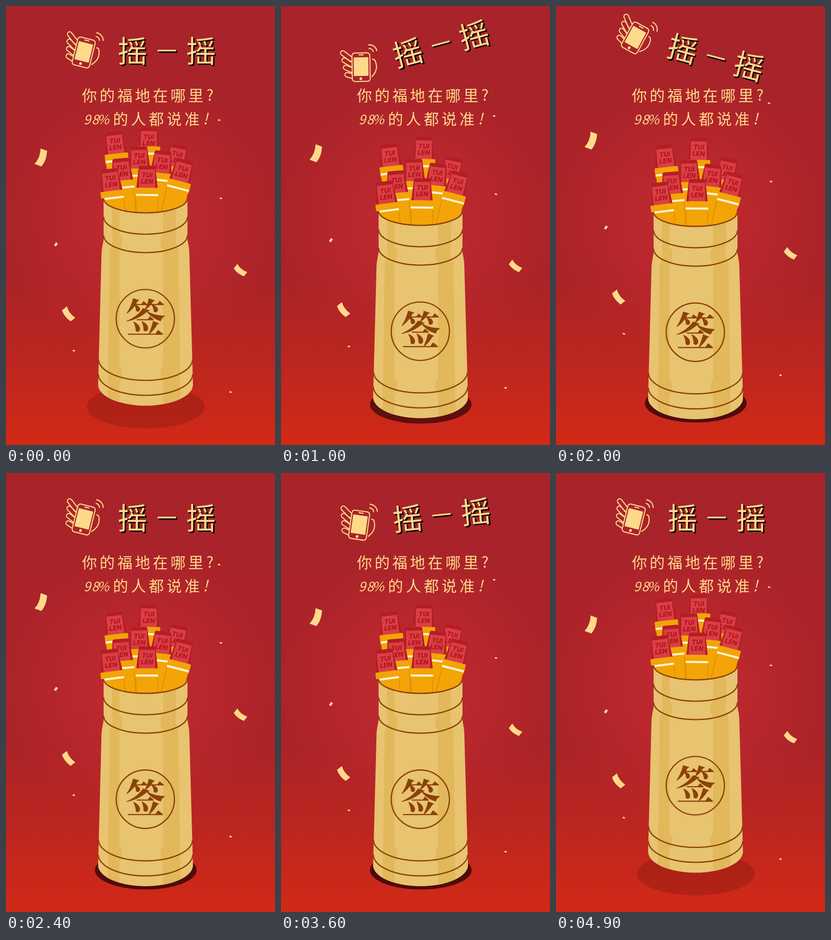
Write an HTML page with a canvas that moves like this. It is 587 by 954 pixels and loops after 5 s.

```html
<!DOCTYPE html>
<html lang="zh-CN">
<head>
<meta charset="utf-8">
<title>摇一摇</title>
<style>
  html, body { margin: 0; width: 100%; height: 100%; overflow: hidden; background: #a9232a; }
  canvas { display: block; width: 587px; height: 954px; }
</style>
</head>
<body>
<canvas id="stage" width="587" height="954" aria-label="摇一摇"></canvas>
<script>
const ctx = document.getElementById('stage').getContext('2d');
const W = 587, H = 954, TAU = Math.PI * 2;
const GOLD = '#ffd98a', BROWN = '#8c410b', TUBE = '#e8c370', SHADE = '#e1b85a';
const RED = '#da3f44', DEEP = '#b51d26', YELLOW = '#f3a406';
const CJK = '"Noto Sans CJK SC", "Noto Sans CJK", "Noto Sans CJK JP", sans-serif';
const SONG = '"Noto Serif CJK SC", "Noto Serif CJK", ' + CJK;

const clamp = (v, a = 0, b = 1) => Math.min(b, Math.max(a, v));
const mix = (a, b, p) => a + (b - a) * p;

function at(x, y, deg, draw) {
  ctx.save();
  ctx.translate(x, y);
  ctx.rotate(deg * Math.PI / 180);
  draw();
  ctx.restore();
}

function shape(d, fill) {
  ctx.fillStyle = fill;
  ctx.fill(new Path2D(d));
}

// a band centred on x = 0, from half width a at y1 to half width b at y2
function band(a, y1, b, y2, fill) {
  shape(`M${-a} ${y1}H${a}L${b} ${y2}H${-b}Z`, fill);
}

function box(x, y, w, h, r, fill) {
  ctx.beginPath();
  ctx.roundRect(x, y, w, h, r);
  if (fill) { ctx.fillStyle = fill; ctx.fill(); } else ctx.stroke();
}

function text(s, x, y, font, fill) {
  ctx.font = font;
  ctx.textAlign = 'center';
  ctx.textBaseline = 'middle';
  ctx.fillStyle = fill;
  ctx.fillText(s, x, y);
}

function spread(s, x, y, gap, font) {
  [...s].forEach((c, i) => text(c, x + i * gap, y, font, GOLD));
}

function background() {
  let g = ctx.createLinearGradient(0, 0, 0, H);
  g.addColorStop(0, '#a9232b');
  g.addColorStop(0.62, '#aa2327');
  g.addColorStop(0.8, '#bb2620');
  g.addColorStop(1, '#d22917');
  ctx.fillStyle = g;
  ctx.fillRect(0, 0, W, H);
  g = ctx.createRadialGradient(293, 465, 20, 293, 465, 310);
  g.addColorStop(0, 'rgba(196,42,50,.85)');
  g.addColorStop(0.5, 'rgba(194,42,48,.55)');
  g.addColorStop(1, 'rgba(190,40,46,0)');
  ctx.fillStyle = g;
  ctx.fillRect(0, 0, W, H);
}

function phone() {
  ctx.strokeStyle = GOLD;
  ctx.lineCap = ctx.lineJoin = 'round';
  ctx.lineWidth = 2.3;
  for (let i = 0; i < 4; i++) {
    at(139 - i, 61 + i * 16, 52 - i * 7, () => box(-5, -5, 34 - i * 4, 10, 5));
  }
  ctx.stroke(new Path2D('M198 91 Q204 91 203 103 Q203 117 187 127'));
  for (const r of [9, 17]) {
    ctx.beginPath();
    ctx.arc(195, 75, r, -1.4, 0);
    ctx.stroke();
  }
  at(169.5, 101, 14, () => {
    box(-19.5, -31, 39, 62, 6, '#a9232b');
    box(-19.5, -31, 39, 62, 6);
    box(-16, -21.5, 32, 40.5, 1, GOLD);
    box(-5, -28, 11, 2.4, 1, GOLD);
    box(-4, 22, 6, 6, 3, GOLD);
  });
}

function title(deg) {
  at(293.5, 97, deg, () => {
    ctx.translate(-293.5, -97);
    phone();
    for (const [d, color] of [[3, '#090303'], [1.5, '#090303'], [0, GOLD]]) {
      [...'摇一摇'].forEach((c, i) => {
        const size = c === '一' ? 44 : 65;
        text(c, 276 + i * 74.7 + d, 97 + d, `400 ${size}px ${CJK}`, color);
      });
    }
  });
}

function captions() {
  const font = `400 33px ${CJK}`;
  spread('你的福地在哪里', 182, 194, 38.7, font);
  spread('?', 445, 193, 0, font);
  spread('98%', 177, 246, 17.5, `italic 400 28px ${CJK}`);
  spread('的人都说准', 250, 245, 39, font);
  spread('!', 435, 244, 0, 'italic ' + font);
}

function curl(x, y, deg, size) {
  at(x, y, deg, () => {
    ctx.scale(size, size);
    shape('M-7 -18 H8 Q14 2 8 18 H-8 Q-1 2 -7 -18Z', GOLD);
  });
}

function confetti(rise) {
  ctx.save();
  ctx.translate(0, -rise);
  curl(76, 329, 20, 1);
  curl(512, 574, 128, 0.78);
  curl(137, 669, 142, 0.85);
  for (const [x, y] of [[465, 248], [469, 418], [148, 749], [490, 839]]) {
    at(x, y, 15, () => ctx.fillRect(-2.5, -1.5, 5, 3));
  }
  at(109, 518, 35, () => ctx.fillRect(-2.5, -4, 5, 8));
  ctx.restore();
}

function shadow(a, b) {
  const alpha = mix(mix(0.18, 0.52, a), 0.85, b);
  ctx.fillStyle = `rgba(58,8,9,${alpha})`;
  ctx.beginPath();
  ctx.ellipse(305, mix(871, 863, b), mix(128.5, 111, a), mix(47, 42, a), 0, 0, TAU);
  ctx.fill();
}

// three rows from back to front; the tilt fans out from the middle
const rows = [
  [[312, 257], [235, 273], [378, 302]],
  [[290, 305], [343, 315], [250, 331]],
  [[391, 334], [225, 354], [308, 347]]
];

function stick(x, y, sink) {
  const off = x - 306, tilt = off * (off > 0 ? 0.17 : 0.09);
  at(x, y, tilt, () => {
    ctx.save();
    ctx.translate(0, sink);
    band(18, 2, 24, 54, DEEP);
    box(-17.5, 0, 35, 14, 3, DEEP);
    band(17, 8, 18, 49, RED);
    const font = 'italic 800 14px Inter, Lato, sans-serif';
    text('TUI', 0, 21, font, '#b2141d');
    text('LEN', 0, 35, font, '#b2141d');
    ctx.restore();
    band(25, 49, 21, 175, YELLOW);
    ctx.strokeStyle = 'rgba(190,70,10,.6)';
    ctx.lineWidth = 0.8;
    ctx.stroke(new Path2D('M-24 68 L-21 175 M24 68 L21 175'));
    box(-25.5, 48, 51, 21, 2, YELLOW);
    band(24.5, 61.5, 24.3, 66, '#fff3cf');
  });
}

function arc(cy, rx, ry) {
  ctx.beginPath();
  ctx.ellipse(304.5, cy, rx, ry, 0, 0, Math.PI);
  ctx.stroke();
}

// a darker strip down the tube, bulging where the tube changes width
function stripe(inner, side) {
  const outer = d => inner + side * d;
  const neck = side < 0 ? 16 : 28;
  shape(`M${inner} 420 V880 H${outer(neck + 10)} L${outer(neck + 5)} 530 ` +
    `Q${outer(neck - 4)} 512 ${outer(neck)} 497 V420Z`, SHADE);
  for (const y of [512, 800]) {
    ctx.beginPath();
    ctx.ellipse(inner, y, 6, 16, 0, 0, TAU);
    ctx.fill();
  }
}

function tube(drop, sink) {
  ctx.save();
  ctx.translate(0, drop);

  ctx.save();
  ctx.beginPath();
  ctx.rect(150, 200, 310, 218);
  ctx.ellipse(304.5, 418, 92, 31.5, 0, 0, Math.PI);
  ctx.clip();
  shape('M213 418 A91.5 31.5 0 0 0 396 418Z', YELLOW);
  rows.forEach((row, r) => row.forEach(([x, y], i) => stick(x, y, r + i ? 0 : sink)));
  ctx.restore();

  const body = new Path2D('M213 418 A91.5 31.5 0 0 0 396 418 V508 Q400 528 400 536 ' +
    'L408 823 A103.5 45.5 0 0 1 201 823 L208.5 536 Q209 528 213 508Z');
  ctx.fillStyle = TUBE;
  ctx.fill(body);
  ctx.save();
  ctx.clip(body);
  stripe(247.5, -1);
  stripe(343, 1);
  ctx.restore();

  ctx.strokeStyle = BROWN;
  ctx.lineWidth = 2.7;
  ctx.lineCap = 'butt';
  arc(418, 91.5, 31.5);
  arc(458, 91.5, 38);
  arc(498, 91.5, 38);
  arc(768, 102.5, 45.5);
  arc(800, 103, 46);
  ctx.beginPath();
  ctx.arc(304, 679.5, 63.5, 0, TAU);
  ctx.stroke();
  text('签', 304, 677, `700 87px ${SONG}`, BROWN);
  ctx.restore();
}

function swing(t) {
  if (t <= 600) return 0;
  if (t < 1400) return -15 * Math.sin((t - 600) / 800 * Math.PI);
  return 15.5 * Math.sin((t - 1400) / 1000 * Math.PI);
}

function rise(t) {
  return t < 1400 ? clamp((t - 600) / 800) * 18.3 : 18.3 + (t - 1400) * 0.0305;
}

// ten pictures a second, forward then back
function render(now) {
  const step = Math.floor(now % 5000 / 100);
  const t = Math.min(step, 49 - step) * 100;
  const fall = (1 - Math.cos(Math.PI * clamp(t / 1200))) / 2;
  background();
  captions();
  title(swing(t));
  confetti(rise(t));
  shadow(clamp(t / 600), clamp((t - 600) / 600));
  tube(29.4 * Math.pow(fall, 1.1), 7 * (1 - clamp(t / 100)));
}

function loop() {
  render(performance.now());
  requestAnimationFrame(loop);
}
loop();
</script>
</body>
</html>
```
